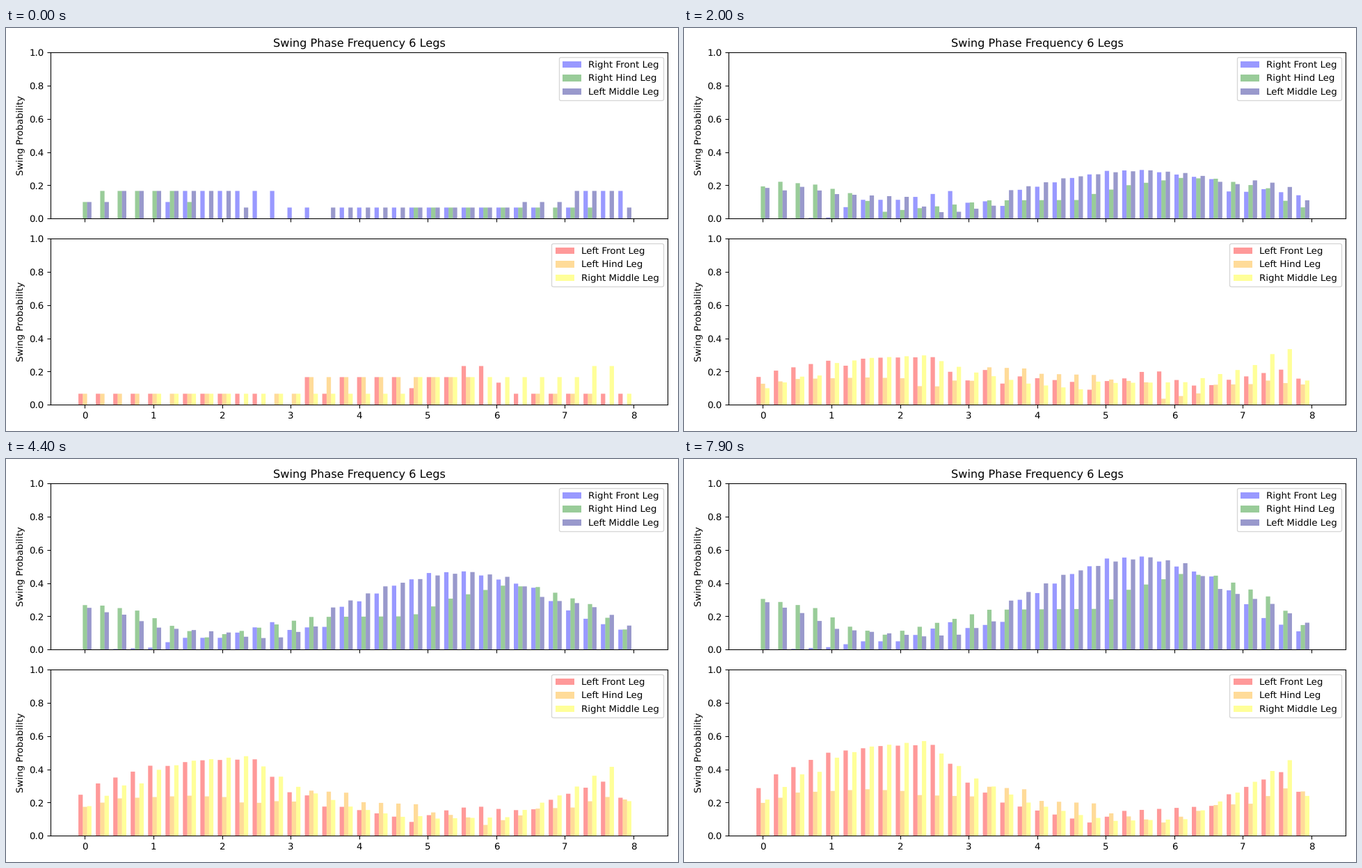
These frames come from a looping animation (966 by 580 pixels, 8 s). A matplotlib script:

```python
import matplotlib.pyplot as plt
import numpy as np
from matplotlib.animation import FuncAnimation

DPI = 96
W, H = 966, 580
FRAMES, INTERVAL = 80, 100
BINS, STEP = 32, 0.254
WIDTH = STEP / 4
LOW, MID, HIGH, PEAK = 1 / 15, 1 / 10, 1 / 6, 7 / 30

plt.rcParams.update({"font.family": "DejaVu Sans", "font.size": 10.06,
                     "text.hinting": "none"})

bins = np.arange(BINS)


def steps(*spans):
    """Flat levels over (level, first bin, last bin) spans, zero elsewhere."""
    y = np.zeros(BINS)
    for level, first, last in spans:
        y[first:last + 1] = level
    return y


def curve(*points):
    """Straight lines through (bin, probability) points."""
    return np.interp(bins, *zip(*points))


right_front = (
    steps((LOW, 12, 28), (MID, 5, 5), (HIGH, 6, 11), (0, 14, 14), (0, 27, 27),
          (HIGH, 29, 31)),
    curve((1, 0), (4, .015), (6, .05), (8, .05), (11, .165), (12, .13),
          (14, .167), (15, .3), (16, .34), (18, .455), (20, .548), (22, .56),
          (26, .44), (29, .19), (31, .11)),
)
right_hind = (
    steps((MID, 0, 6), (HIGH, 1, 5), (LOW, 19, 29)),
    curve((0, .305), (3, .25), (5, .138), (7, .09), (11, .185), (13, .24),
          (19, .245), (21, .36), (24, .455), (26, .445), (29, .32),
          (31, .148)),
)
left_middle = (
    steps((MID, 0, 1), (HIGH, 2, 8), (LOW, 9, 9), (LOW, 14, 31),
          (MID, 25, 27), (HIGH, 28, 30)),
    curve((0, .285), (2, .22), (4, .125), (9, .08), (11, .09), (13, .17),
          (14, .295), (17, .45), (20, .53), (22, .555), (24, .52),
          (26, .365), (29, .275), (31, .162)),
)
left_front = (
    steps((LOW, 0, 10), (0, 5, 5), (HIGH, 13, 21), (LOW, 14, 14),
          (MID, 19, 19), (PEAK, 22, 23), (2 * LOW, 24, 24), (LOW, 25, 31)),
    curve((0, .287), (1, .37), (4, .5), (7, .54), (10, .547), (12, .32),
          (14, .2), (19, .08), (21, .15), (26, .18), (27, .25), (30, .383),
          (31, .265)),
)
left_hind = (
    steps((LOW, 0, 12), (0, 9, 10), (HIGH, 13, 22), (LOW, 26, 29)),
    curve((0, .198), (2, .26), (6, .28), (8, .27), (9, .245), (12, .237),
          (13, .295), (15, .28), (16, .21), (19, .195), (20, .135),
          (23, .08), (26, .185), (28, .193), (30, .285), (31, .267)),
)
right_middle = (
    steps((LOW, 4, 31), (HIGH, 19, 28), (PEAK, 29, 30)),
    curve((0, .218), (2, .37), (3, .385), (4, .47), (6, .537), (9, .57),
          (12, .345), (15, .2), (18, .125), (20, .09), (24, .1), (27, .26),
          (30, .455), (31, .24)),
)

PANELS = (
    (("Right Front Leg", "blue", right_front),
     ("Right Hind Leg", "green", right_hind),
     ("Left Middle Leg", "navy", left_middle)),
    (("Left Front Leg", "red", left_front),
     ("Left Hind Leg", "orange", left_hind),
     ("Right Middle Leg", "yellow", right_middle)),
)


def ease_out(s):
    return 1 - (1 - s) ** 2.1


fig, axes = plt.subplots(2, 1, sharex=True, figsize=(W / DPI, H / DPI),
                         dpi=DPI)
fig.subplots_adjust(left=64.2 / W, right=951.3 / W, bottom=1 - 542.3 / H,
                    top=1 - 35.1 / H, hspace=0.12)

series = []
for ax, legs in zip(axes, PANELS):
    for slot, (label, color, (start, settled)) in enumerate(legs):
        bars = ax.bar(bins * STEP + (slot - 1) * WIDTH, start, WIDTH,
                      color=color, alpha=0.4, label=label, snap=False)
        series.append((bars, start, settled))
    ax.set_xlim(-0.5, 8.5)
    ax.set_ylim(0, 1)
    ax.set_xticks(range(9))
    ax.set_ylabel("Swing Probability")
    ax.legend(loc="upper right", labelspacing=0.53)
axes[0].set_title("Swing Phase Frequency 6 Legs")


def update(frame):
    u = ease_out(frame / (FRAMES - 1))
    for bars, start, settled in series:
        for bar, h in zip(bars, start + (settled - start) * u):
            bar.set_height(h)
    return [bar for bars, *_ in series for bar in bars]


anim = FuncAnimation(fig, update, frames=FRAMES, interval=INTERVAL,
                     repeat=True, repeat_delay=0, blit=False)
plt.show()
```
